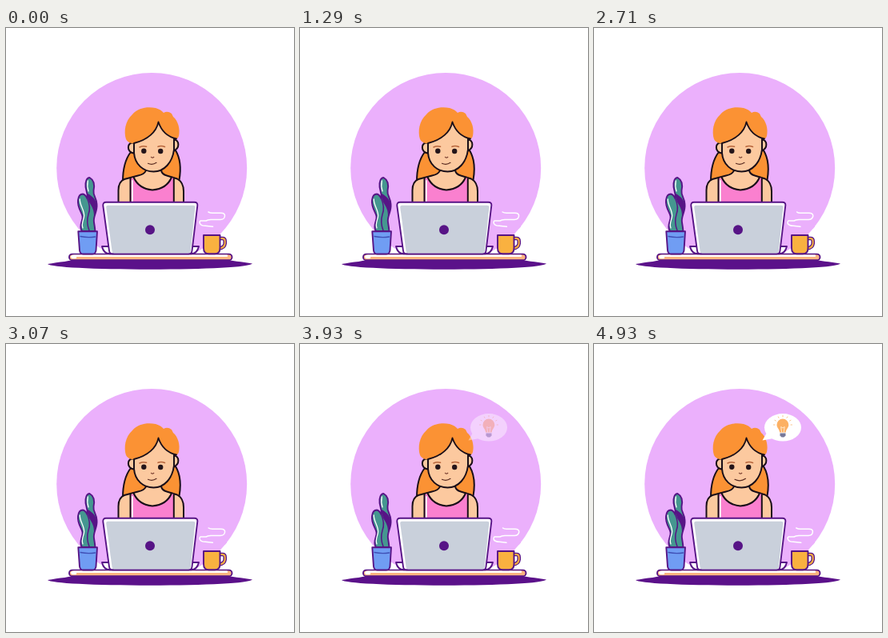
Write an HTML page that moves like this. It is 360 px wide and 360 px high and loops after 5 s.

```html
<!DOCTYPE html>
<html lang="en">
<head>
<meta charset="utf-8">
<title>Working at a laptop</title>
<style>
html, body { margin: 0; width: 100%; height: 100%; overflow: hidden; background: #fff; }
svg { display: block; width: 100vw; height: 100vh; }
.ink { stroke: #190e18; stroke-width: 2; stroke-linejoin: round; stroke-linecap: round; }
.plum { stroke: #571486; stroke-width: 1.9; stroke-linejoin: round; stroke-linecap: round; }
.line { fill: none; stroke-linecap: round; stroke-linejoin: round; }
</style>
</head>
<body>
<svg viewBox="0 0 360 360" xmlns="http://www.w3.org/2000/svg">
  <rect width="360" height="360" fill="#fff"/>
  <circle cx="182.2" cy="175" r="119" fill="#ebb0fc"/>

  <!-- back hair -->
  <path class="ink" fill="#fb9234" d="M156 155C149 164 146 178 146 192L152 205H211L216.500 190C219 176 218.500 164 212 153Z"/>

  <!-- body -->
  <path class="ink" fill="#fcc99f" d="M140.500 219V203Q140.500 192 148 189L165 184.500Q173 183 175 178H194Q195 183 201 184.500L214 188.500Q222 193 222 204V219Z"/>
  <path fill="#fa80cf" d="M156 219V188L160 187Q167 201 183 202.500Q200 201 206.500 187L210 188V219Z"/>
  <path class="line" stroke="#fff" stroke-width="1.800" d="M157.800 217V191"/>
  <path class="ink line" d="M155.500 219V187.500M209.800 219V188.500M159.500 186.500Q166 201 183 202.500Q201 201 207 186.500"/>

  <!-- head -->
  <path class="ink" fill="#fcc99f" d="M160 144C151 141 150 156 160 156.500M209 140C217.500 138 217.500 153 209 153"/>
  <path class="ink" fill="#fcc99f" d="M160 138V156C161 171 172 179.500 184.500 179.500C198 179.500 208 168 210 152V136L189 116Z"/>
  <path fill="#fb9234" d="M150 139C147 129 149 116 158 108C165 100 176 98 187 100Q194 102 197 106Q202 103 207 107L209 111C215 116 218 126 216 135Q215 139 211 138.500C202 135 194 128 190.500 118C187 131 176 140 161 144Q153 145 150 139Z"/>
  <path class="line" stroke="#190e18" stroke-width="1.800" d="M190.500 117.500C188 130 177 140 160 144M190.500 117.500C194 128 202 136 213 138.500"/>

  <!-- face -->
  <path class="line" stroke="#b8663c" stroke-width="1.600" d="M167 149Q171 147 175.500 148.300M190 148.300Q194 146.600 198.500 148.500"/>
  <circle cx="172.300" cy="153.700" r="3.200" fill="#24151a"/>
  <circle cx="193.200" cy="154" r="3.200" fill="#24151a"/>
  <path class="line" stroke="#7a4030" stroke-width="1.200" d="M181.500 161.300Q183 163 184.800 161.300"/>
  <path id="mouth" class="line" stroke="#57291f" stroke-width="1.200"/>

  <!-- desk -->
  <path fill="#5b118a" d="M52 295C66 292.500 82 291.500 90 288H272C280 291.500 296 292 308 294.500C304 299 250 301.700 180 301.700S56 299 52 295Z"/>
  <rect class="plum" x="79" y="282.600" width="203.500" height="7.600" rx="3.800" fill="#fbb480"/>
  <path class="line" stroke="#fff" stroke-width="2.400" d="M82 286Q82.500 284.800 85 284.800H276M83 287H87"/>

  <!-- plant -->
  <path class="plum" fill="#459790" d="M95 254C90 246 97 241 95.500 235C94 229 89 224 90 215Q91 207.500 96 207.500Q99 208 101.500 213C103 207 98.500 202 99.500 194Q100.500 187 104.500 187C110 190 111 196 109.500 203C108.500 209 113 212 113.500 220C114.500 230 108.500 235 110 243Q111 249 111.500 254Z"/>
  <path fill="#571486" d="M101 206C105 209 112 212 113.500 221Q114 230 110 235Q110 227 106 221Q102 215 101 206Z"/>
  <path class="line" stroke="#fff" stroke-width="1.300" d="M92.300 214C92 222 99 229 97.500 236C96.500 241 94 245 96 250M102.300 191Q101 198 103 204"/>
  <path class="line" stroke="#571486" stroke-width="1.500" d="M101.500 213Q106.500 224 103 233Q100 243 104 253"/>
  <path class="plum" fill="#709df3" d="M90.300 254.200H114L112.500 278Q112 282.500 108 282.500H96.500Q92.500 282.500 92 278Z"/>
  <path class="line" stroke="#3f4fb5" stroke-width="1.300" d="M93 260.500Q102 262.500 111.500 261"/>

  <!-- laptop -->
  <path class="plum" fill="#fff" d="M120 273H241Q239 282.300 231 282.300H130Q122 282.300 120 273Z"/>
  <path class="plum" fill="#fff" d="M125 217.800H235.500Q239.800 217.800 239.300 222L232.500 278.500Q232 282.300 228.500 282.300H133Q129.500 282.300 129 278.500L121.300 222Q121 217.800 125 217.800Z"/>
  <path fill="#c9d0db" d="M127.500 221.800H234Q236.700 221.800 236.400 224.500L230.800 279Q230.500 281.400 228 281.400H135Q133 281.400 132.600 279L125.300 224.500Q125 221.800 127.500 221.800Z"/>
  <circle cx="180" cy="252.300" r="6" fill="#571486"/>

  <!-- cup -->
  <path class="line" stroke="#571486" stroke-width="4.600" d="M267 263H270.500Q273.700 263 273.700 266.500V269.500Q273 275 266 275.500"/>
  <path class="line" stroke="#f9b140" stroke-width="2" d="M267 263H270.500Q273.700 263 273.700 266.500V269.500Q273 275 266 275.500"/>
  <path class="plum" fill="#f9b140" d="M247 259H267.500V275Q267.500 282.300 261 282.300H253.500Q247 282.300 247 275Z"/>
  <path id="steam" class="line" stroke="#fff" stroke-width="1.500"/>

  <!-- idea -->
  <g id="idea">
    <path fill="#fff" d="M216 111L210.500 120.500L224 118Z"/>
    <ellipse cx="236" cy="104.300" rx="23" ry="17.200" fill="#fff"/>
    <path fill="#fcb063" d="M232 110.500C232 106.500 228.500 105 228.500 101A7.400 7.400 0 0 1 243.300 101C243.300 105 239.800 106.500 239.800 110.500Z"/>
    <path class="line" stroke="#fff0d8" stroke-width="0.900" d="M234.500 110L233.700 103.500L236 105L238.200 103.500L237.300 110"/>
    <path fill="#77799a" d="M232.500 111.500H239.500V114.500L237.500 116.500H234.500L232.500 114.500Z"/>
    <path id="rays" class="line" stroke="#fbc58c" stroke-width="1"/>
  </g>
</svg>
<script>
const LOOP = 5000;
const el = id => document.getElementById(id);
const steam = el('steam'), idea = el('idea'), mouth = el('mouth'), rays = el('rays');

const ease = (t, a, b) => {
  const p = Math.min(1, Math.max(0, (t - a) / (b - a)));
  return p * p * (3 - 2 * p);
};

let d = '';
for (let i = 0; i < 7; i++) {
  const a = Math.PI * (1 + i / 6);
  const point = r => (236 + r * Math.cos(a)).toFixed(1) + ' ' + (101 + r * Math.sin(a)).toFixed(1);
  d += `M${point(10)}L${point(11.5)}`;
}
rays.setAttribute('d', d);

function draw(t) {
  const w = 0.7 * Math.sin(t / LOOP * 8 * Math.PI);
  steam.setAttribute('d',
    `M${253 + w} 230Q255 231.300 258 231.300H268Q274 231 ${273.5 + w / 2} 235Q273 239.500 268 239.500H256` +
    `Q252 239.800 250 241H243Q241.500 242 ${242.5 - w / 2} 244.500Q244 247.300 249 247.300L${258.5 - w} 248.300`);

  idea.setAttribute('opacity', ease(t, 3750, 4150));

  const s = ease(t, 4450, 4850);
  mouth.setAttribute('d', `M${177.5 - 1.5 * s} 169.300Q183 ${171.8 + s} ${188 + 1.5 * s} 168.300`);
}

const start = performance.now();
function tick() {
  draw((performance.now() - start) % LOOP);
  requestAnimationFrame(tick);
}
tick();
</script>
</body>
</html>
```
